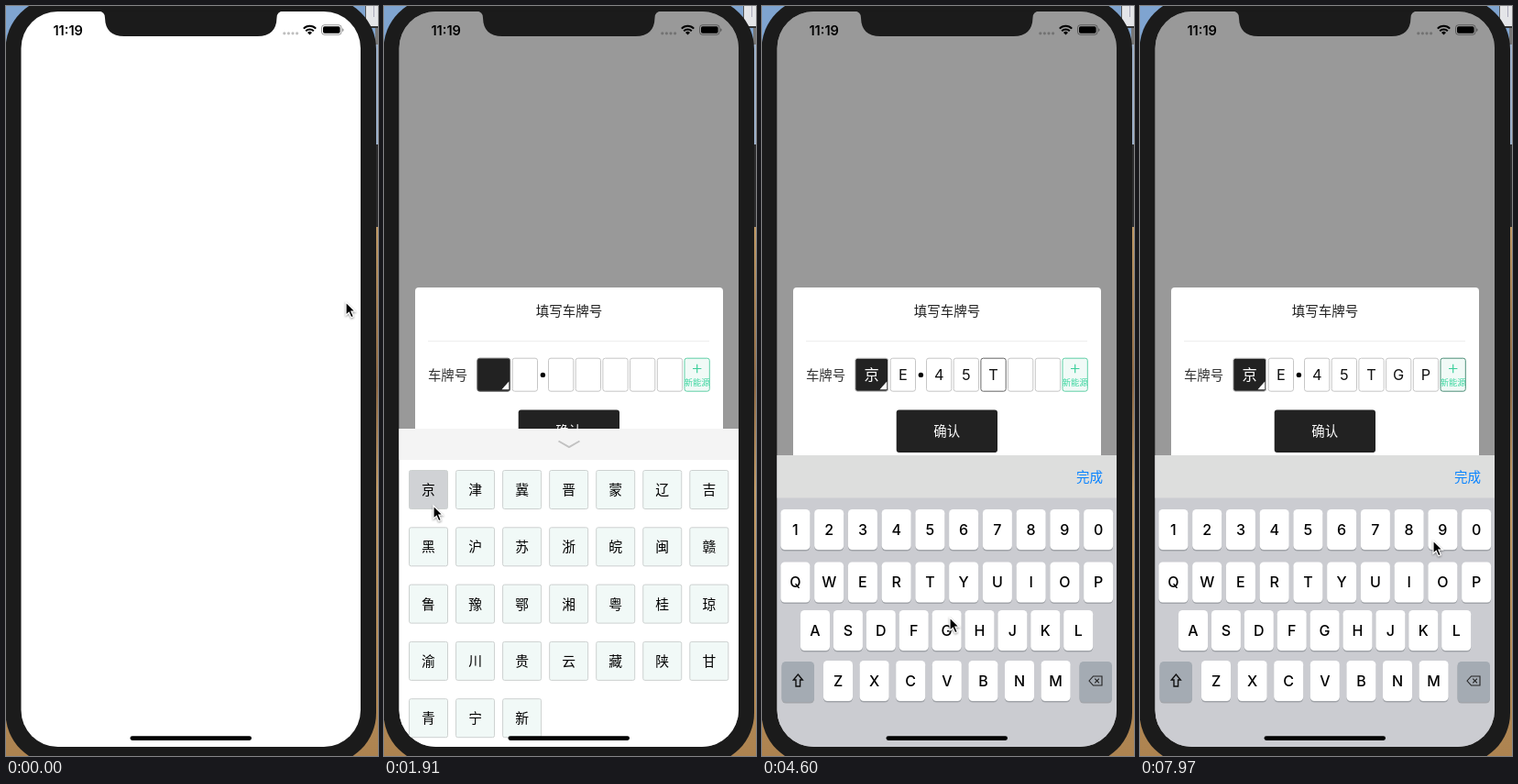
These frames come from a looping animation (406x818 px, 8000 ms). An HTML page:

```html
<!DOCTYPE html>
<html lang="zh">
<head>
<meta charset="utf-8">
<style>
  html, body { margin: 0; width: 100%; height: 100%; overflow: hidden; background: #1b1b1b; }
  svg { display: block; width: 406px; height: 818px; }
  text { font-family: Inter, "Noto Sans CJK SC", "Noto Sans CJK", sans-serif; text-anchor: middle; }
  .cjk { font-family: "Noto Sans CJK SC", "Noto Sans CJK", "Noto Sans CJK JP", sans-serif; }
</style>
</head>
<body>
<svg id="stage" viewBox="0 0 406 818"></svg>
<script>
const LOOP = 8000, BOTTOM = 808;
const KEY = '#fff', GRID_KEY = '#f1f9f7';

const rect = (x, y, w, h, r, fill, more = '') =>
  `<rect x="${x}" y="${y}" width="${w}" height="${h}" rx="${r}" fill="${fill}" ${more}/>`;
const text = (x, y, size, s, more = '') =>
  `<text x="${x}" y="${y}" font-size="${size}" ${more}>${s}</text>`;
const line = (d, color, width, more = '') =>
  `<path d="${d}" fill="none" stroke="${color}" stroke-width="${width}" ${more}/>`;

// Province keyboard, drawn from its own top edge
function gridKeyboard() {
  let out = rect(16, 0, 372, 360, 0, '#fff') + rect(16, 0, 372, 34, 0, '#f4f4f4') +
    line('M190.5 13.5L202 20L213.5 13.5', '#c2c2c2', 2);
  [...'京津冀晋蒙辽吉黑沪苏浙皖闽赣鲁豫鄂湘粤桂琼渝川贵云藏陕甘青宁新'].forEach((c, i) => {
    const x = 27.5 + i % 7 * 51.05, y = 45.5 + Math.floor(i / 7) * 62.3;
    out += rect(x, y, 42, 42, 2, GRID_KEY, `stroke="#cdd1d0" data-key="${c}"`) +
      text(x + 21, y + 26.5, 14.8, c, 'class="cjk"');
  });
  return out;
}

// Letter keyboard; each row gives characters, first x, step and top
function letterKeyboard(rows) {
  let out = rect(16, 0, 372, 400, 0, '#cbccd1') + rect(16, 0, 372, 46.5, 0, '#dddedd') +
    text(357.5, 28.5, 14.5, '完成', 'class="cjk" fill="#0a84ff" font-weight="500"');
  const key = (x, y, w, fill, more = '') =>
    rect(x, y + 1.5, w, 44, 4.5, '#a2a5aa') + rect(x, y, w, 44, 4.5, fill, more);
  for (const [chars, x0, step, y] of rows)
    [...chars].forEach((c, i) => {
      const x = x0 + i * step;
      out += key(x, y, 32, KEY, `data-key="${c}"`) + text(x + 16, y + 27.8, 16, c, 'font-weight="500"');
    });
  const y = rows[rows.length - 1][3], m = y + 22;
  return out + key(21.5, y + 1, 35.5, '#a4abb3') + key(346.5, y + 1, 35.5, '#a4abb3') +
    line(`M39.3 ${m - 7}l5 6h-2.7v7h-4.6v-7h-2.7z`, '#111', 1.4) +
    line(`M357 ${m}l4.5 -5h9.5v10h-9.5zM363.3 ${m - 2.3}l4.6 4.6m0 -4.6l-4.6 4.6`, '#222', 1.1);
}

const LETTERS = [['QWERTYUIOP', 20.4, 36.75], ['ASDFGHJKL', 42, 35.9], ['ZXCVBNM', 67, 39.6]];
const withTops = (rows, tops) => rows.map((r, i) => [...r, tops[i]]);
const abcRows = withTops(LETTERS, [59, 114.5, 170]);
const numRows = withTops([['1234567890', 20.4, 36.75], ...LETTERS], [59, 116.5, 169, 224]);

const cellX = [101.8, 140.2, 179.5, 209.2, 238.9, 268.5, 298.3, 328];
const cellW = i => i ? 27.3 : 35.8;

function dialog() {
  let out = rect(34, 307, 336, 200, 4, '#fff') +
    text(202, 338, 14.5, '填写车牌号', 'class="cjk" fill="#222" font-weight="500"') +
    rect(48, 365, 307, 1, 0, '#eee') +
    text(69.5, 407.5, 14.4, '车牌号', 'class="cjk" fill="#333"');
  cellX.forEach((x, i) => {
    const fill = i == 0 ? '#222' : i == 7 ? '#f1faf7' : '#fff';
    out += rect(x, 384.2, cellW(i), 36, 2.5, fill, `id="cell${i}"`);
  });
  for (let i = 0; i < 7; i++)
    out += `<g id="char${i}">` + text(cellW(i) / 2, 24, 16.3, '', `fill="${i ? '#111' : '#fff'}"`) + '</g>';
  return out + '<path d="M128.5 418.3L136.3 409.5V418.3z" fill="#fff"/>' +
    '<circle cx="173.4" cy="402.4" r="2.7"/>' +
    line('M337 395.5h9.4M341.7 390.8v9.4', '#3ccf9b', 1.2) +
    text(341.6, 413.8, 9.3, '新能源', 'class="cjk" fill="#3cd6a0"') +
    rect(146.7, 440.5, 110.3, 46.5, 3, '#222') +
    text(201.7, 468.7, 14.4, '确认', 'class="cjk" fill="#fff"');
}

function wallpaper() {
  return rect(0, 0, 406, 400, 0, '#7fa4d0') + rect(0, 240, 406, 578, 0, 'url(#sand)') +
    rect(392, 0, 14, 22, 0, '#e4e5e8') + rect(392, 0, 1, 22, 0, '#555') +
    rect(401, 0, 1, 12, 0, '#aab') + rect(392, 22, 14, 2, 0, '#333') +
    rect(403, 24, 3, 18, 0, '#777') + rect(403, 42, 3, 109, 0, '#9db1cb') +
    rect(403, 151, 3, 90, 0, '#2b2b2d');
}

function statusBar() {
  let out = text(67.7, 31.6, 14.6, '11:19', 'font-weight="600"');
  for (let i = 0; i < 4; i++) out += `<circle cx="${303.8 + i * 4.6}" cy="29.8" r="1.6" opacity=".25"/>`;
  return out + line('M324.8 24.6a9.4 9.4 0 0 1 13.4 0M327.2 27.2a6.1 6.1 0 0 1 8.6 0', '#000', 2) +
    '<path d="M331.5 31.6l-2.5 -2.6a3.6 3.6 0 0 1 5 0z"/>' +
    rect(344.5, 20.7, 21.6, 10.6, 3, 'none', 'stroke="#000" stroke-opacity=".4"') +
    rect(346, 22.2, 18.6, 7.6, 1.7, '#000') +
    '<path d="M367.2 24.2a2 2 0 0 1 0 3.8z" opacity=".45"/>';
}

const stage = document.getElementById('stage');
stage.innerHTML = `<defs>
    <clipPath id="screen">${rect(16.5, 6, 370.5, 802, 40, '#000')}</clipPath>
    <linearGradient id="sand" x2="0" y2="1">
      <stop stop-color="#c09a66"/><stop offset=".3" stop-color="#8f6a45"/>
      <stop offset=".5" stop-color="#c49d68"/><stop offset="1" stop-color="#ad8350"/>
    </linearGradient>
  </defs>` +
  wallpaper() + rect(-0.5, -9, 404.5, 836, 56, '#1b1b1b') +
  `<g clip-path="url(#screen)">` + rect(16, 6, 372, 802, 0, '#fff') +
  `<g id="modal">` + rect(16, 6, 372, 802, 0, '#000', 'opacity=".4"') + dialog() + '</g>' +
  `<g id="grid">${gridKeyboard()}</g><g id="abc">${letterKeyboard(abcRows)}</g>` +
  `<g id="num">${letterKeyboard(numRows)}</g>` + rect(135.5, 796.3, 132.5, 4.6, 2.3, '#000') + '</g>' +
  '<path d="M101 5.5Q108 6 108 13Q108.5 33 129 33H274.500Q295 33 295.500 13Q295.500 6 302.500 5.5z" fill="#1b1b1b"/>' +
  statusBar() +
  '<path id="cursor" d="M0 0V14.2L3.300 11.200L5.700 16.700L8.300 15.600L5.900 10.200H10.300z" stroke="#fff" stroke-width="1.2" style="filter:drop-shadow(0 1px 1px #0006)"/>';

const $ = id => document.getElementById(id);

// Presses: time, key, cell it fills
const presses = [
  [1910, '京', 0], [2730, 'E', 1], [3600, '4', 2], [4050, '5', 3], [4420, 'T', 4],
  [4720, 'G', 5], [5180, 'J', 6], [6050, 'L', 6], [6500, 'P', 6], [7210, '', 7]
];
const PRESS_MS = 110;

// Pointer: time, x, y
const path = [
  [0, 371, 323], [119, 371, 323], [120, 370, 323], [260, 370, 323], [700, 364, 324], [1060, 333, 330],
  [1170, 301, 375], [1400, 140, 485], [1580, 51, 556], [1680, 54, 545], [1910, 54, 545],
  [2370, 108, 557], [2600, 112, 630], [2800, 112, 630], [2980, 124, 635], [3450, 146, 581],
  [3720, 146, 581], [3980, 182, 580], [4130, 182, 580], [4370, 184, 630], [4460, 185, 631],
  [4600, 205, 667], [4820, 204, 676], [5160, 268, 677], [5320, 268, 677], [5870, 341, 673],
  [6120, 341, 673], [6420, 368, 628], [6580, 368, 628], [6800, 377, 463], [7030, 342, 402],
  [7620, 342, 402], [7970, 320, 583], [8000, 320, 583]
];

function pointer(t) {
  const i = Math.max(1, path.findIndex(p => p[0] > t));
  const [t0, x0, y0] = path[i - 1], [t1, x1, y1] = path[i], f = (t - t0) / (t1 - t0);
  return [x0 + (x1 - x0) * f, y0 + (y1 - y0) * f];
}

// Critically damped rise from 0 to 1
function spring(ms) {
  const x = Math.max(0, ms / 57);
  return x > 9 ? 1 : 1 - (1 + x) * Math.exp(-x);
}

const SHOW = 420, TO_ABC = 1970, TO_NUM = 2850;
const place = (id, x, y, scale = 1) => $(id).setAttribute('transform', `translate(${x} ${y}) scale(${scale})`);

function draw(t) {
  const show = spring(t - SHOW), abc = spring(t - TO_ABC), num = spring(t - TO_NUM);
  $('modal').setAttribute('opacity', Math.min(1, Math.max(0, (t - 260) / 300)));
  place('grid', 0, BOTTOM - 347 * (show - abc));
  place('abc', 0, BOTTOM - 255 * (abc - num));
  place('num', 0, BOTTOM - 318 * num);

  const chars = Array(8).fill('');
  let focus = 0, down = '';
  for (const [at, key, cell] of presses) {
    if (t < at) break;
    chars[cell] = key;
    focus = cell;
    down = t < at + PRESS_MS ? key : '';
  }
  for (let i = 0; i < 8; i++) {
    const plain = i == 7 ? '#5fcfa6' : '#c6c6c6';
    $('cell' + i).setAttribute('stroke', i != focus ? plain : i == 7 ? '#4d8f78' : '#666');
    if (i == 7) continue;
    place('char' + i, cellX[i], 384.2, i == 0 ? abc : i == 1 ? num : 1);
    $('char' + i).firstChild.textContent = chars[i];
  }
  for (const k of stage.querySelectorAll('[data-key]')) {
    const base = k.dataset.key > 'Z' ? GRID_KEY : KEY;
    k.setAttribute('fill', k.dataset.key == down ? '#d0d2d5' : base);
  }
  place('cursor', ...pointer(t));
}

let start;
function tick(now) {
  start ??= now;
  draw((now - start) % LOOP);
  requestAnimationFrame(tick);
}
draw(0);
requestAnimationFrame(tick);
</script>
</body>
</html>
```
